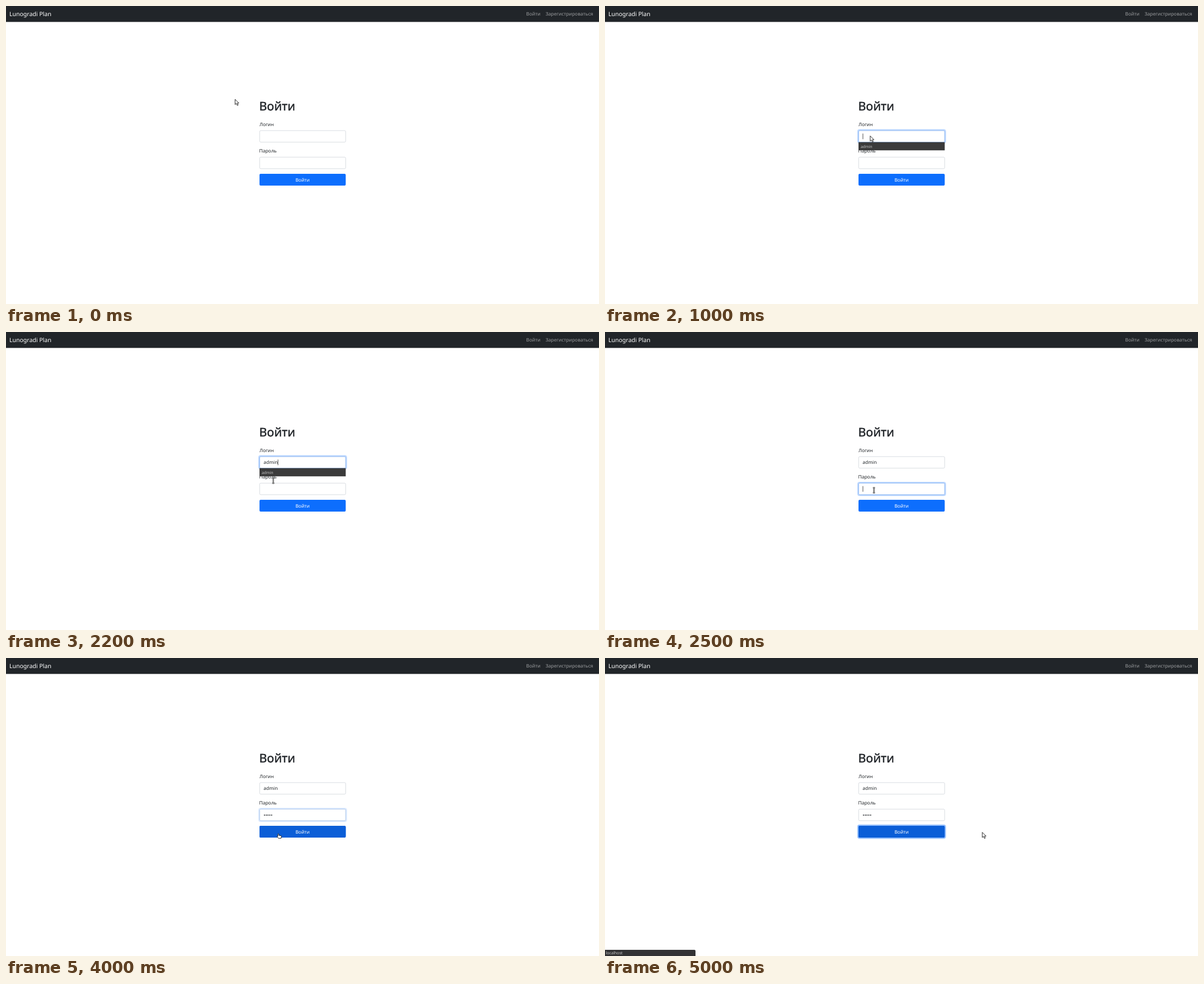
These frames come from a looping animation (1055x531 px, 8 s). An HTML page:

```html
<!DOCTYPE html>
<html lang="ru">
<head>
<meta charset="utf-8">
<title>Вход</title>
<style>
  html, body { margin: 0; width: 100%; height: 100%; overflow: hidden; background: #fff; }
  svg { display: block; width: 1055px; height: 531px; }
  text { font: 8.4px "Noto Sans", "Open Sans", sans-serif; fill: #212529; text-rendering: geometricPrecision; }
  .brand { font-size: 10.5px; fill: #fff; }
  .link { fill: #9b9d9f; }
  .title { font-size: 21.2px; stroke: #212529; stroke-width: .5px; }
  .hint { font-size: 6.9px; fill: #c4c4c4; }
  .status { font-size: 7.1px; fill: #c8c8c8; }
  .field { fill: #fff; stroke: #ced4da; stroke-width: .8; }
  .focus rect { fill: none; }
  .ring { stroke: #0d6efd; stroke-opacity: .27; stroke-width: 2.2; }
  .edge { stroke: #86b7fe; stroke-width: .8; }
  .caret { fill: #222; }
</style>
</head>
<body>
<svg viewBox="0 0 1055 531">
  <rect width="1055" height="28.4" fill="#212529"/>
  <text class="brand" x="6" y="17.5">Lunogradi Plan</text>
  <text class="link" x="925.6" y="16.6">Войти</text>
  <text class="link" x="959.9" y="16.6">Зарегистрироваться</text>

  <text class="title" x="450.6" y="186">Войти</text>
  <text x="451" y="214">Логин</text>
  <text x="450.6" y="261.3">Пароль</text>

  <rect class="field" x="451.3" y="222" width="153" height="20.6" rx="2"/>
  <g class="focus" id="loginFocus">
    <rect class="ring" x="450" y="220.7" width="155.6" height="23.2" rx="3"/>
    <rect class="edge" x="451.3" y="222" width="153" height="20.6" rx="2"/>
  </g>
  <text id="login" x="458.3" y="235.4"></text>
  <rect class="caret" id="loginCaret" y="227.3" width=".8" height="10"/>

  <rect class="field" x="451.3" y="269.3" width="153" height="20.6" rx="2"/>
  <g class="focus" id="passFocus">
    <rect class="ring" x="450" y="268" width="155.6" height="23.2" rx="3"/>
    <rect class="edge" x="451.3" y="269.3" width="153" height="20.6" rx="2"/>
  </g>
  <text id="pass" x="458.3" y="282.6"></text>
  <rect class="caret" id="passCaret" y="274.6" width=".8" height="10"/>

  <rect x="451" y="299" width="153.4" height="21" rx="2" fill="#0d6efd"/>
  <rect id="hover" x="451" y="299" width="153.4" height="21" rx="2" fill="#0b5ed7"/>
  <rect id="buttonFocus" x="449.9" y="297.9" width="155.6" height="23.2" rx="3"
        fill="none" stroke="#3184fd" stroke-opacity=".5" stroke-width="2.2"/>
  <text x="514.9" y="312.5" style="fill:#fff">Войти</text>

  <g id="popup">
    <rect x="451" y="242.6" width="153.4" height="14.6" fill="#3b3b3b"/>
    <text class="hint" x="455" y="252.6">admin</text>
  </g>
  <g id="status">
    <path d="M0 520H159Q161 520 161 522V531H0Z" fill="#323234"/>
    <text class="status" x="1.4" y="528.4">localhost</text>
  </g>

  <g id="pointer" stroke-linejoin="round">
    <path id="arrow" d="M0 0V9.3L2.2 7.3L3.8 10.9L5.5 10.1L3.9 6.7H6.7Z" fill="#fff" stroke="#111" stroke-width=".9"/>
    <g id="beam" fill="none">
      <path d="M-1.8-4.4H1.8M-1.8 4.4H1.8M0-4.4V4.4" stroke="#333" stroke-width="2"/>
      <path d="M-1.8-4.4H1.8M-1.8 4.4H1.8M0-4.4V4.4" stroke="#ddd" stroke-width=".5"/>
    </g>
    <path id="hand" d="M2.1 5.6V1.2Q2.9 0 3.7 1.2V3.6L7.6 4.4Q8.6 4.7 8.5 5.8L7.8 9H3.4L.5 6.2Q.7 5 2.1 5.6Z"
          fill="#fff" stroke="#111" stroke-width=".9"/>
  </g>
</svg>
<script>
const LOOP = 8000, STEP = 100;
const el = id => document.getElementById(id);
const show = (id, on) => el(id).style.display = on ? "" : "none";
const during = (t, from, to) => t >= from && t < to;
const ramp = (t, start) => Math.min(1, Math.max(0, (t - start) / 150));
const fade = (id, t, on, off = LOOP) => el(id).style.opacity = ramp(t, on) - ramp(t, off);

// time, x, y, pointer shape from that time on
const path = [
  [0, 407.6, 166.3, "arrow"], [100, 407.6, 166.3, "arrow"], [500, 448, 207, "beam"],
  [800, 474, 233, "beam"], [900, 474, 233, "beam"], [1000, 471.8, 231.5, "arrow"],
  [1900, 471.8, 231.5, "arrow"], [2200, 475.5, 265, "beam"], [2400, 478.5, 282, "beam"],
  [3500, 478.5, 282, "beam"], [3700, 476.3, 293.5, "arrow"], [3800, 476.3, 293.5, "arrow"],
  [3900, 479, 304, "hand"], [4000, 481.6, 312.3, "hand"], [4700, 481.6, 312.3, "hand"],
  [4800, 601.4, 312.3, "hand"], [4900, 601.4, 312.3, "hand"], [5000, 671.2, 310.6, "arrow"],
  [LOOP, 671.2, 310.6, "arrow"]
];
const loginKeys = [1200, 1400, 1600, 1700, 1800];
const passKeys = [2600, 2800, 3000, 3200, 3400];

function type(id, word, keys, t, from, to) {
  const text = el(id), caret = el(id + "Caret");
  text.textContent = word.slice(0, keys.filter(k => t >= k).length);
  caret.setAttribute("x", 458.5 + text.getComputedTextLength());
  show(id + "Caret", during(t, from, to));
}

function movePointer(t) {
  const i = path.findIndex((key, n) => n === path.length - 2 || t < path[n + 1][0]);
  const [t0, x0, y0, shape] = path[i], [t1, x1, y1] = path[i + 1];
  const k = (t - t0) / (t1 - t0);
  el("pointer").setAttribute("transform", `translate(${x0 + (x1 - x0) * k} ${y0 + (y1 - y0) * k})`);
  for (const name of ["arrow", "beam", "hand"]) show(name, name === shape);
}

function draw(now) {
  const t = Math.floor(now % LOOP / STEP) * STEP;
  type("login", "admin", loginKeys, t, 900, 2400);
  type("pass", "•••••", passKeys, t, 2400, 3600);
  fade("loginFocus", t, 850, 2350);
  fade("passFocus", t, 2350, 3930);
  fade("hover", t, 3850);
  fade("buttonFocus", t, 4000);
  show("popup", during(t, 1000, 2300));
  show("status", t >= 4200);
  movePointer(t);
}

const start = performance.now();
function tick() {
  draw(performance.now() - start);
  requestAnimationFrame(tick);
}
tick();
</script>
</body>
</html>
```
